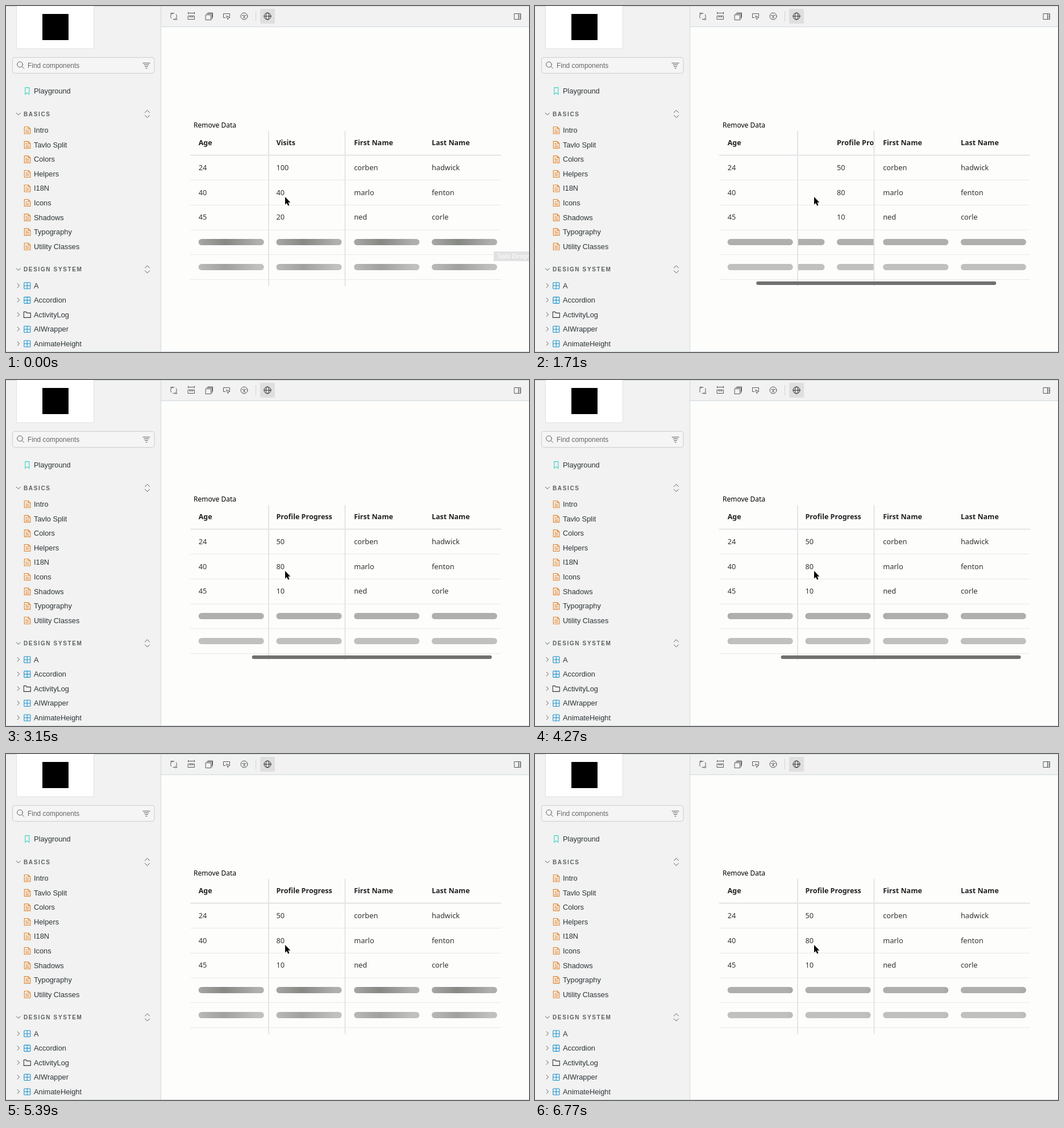
Recreate the animation shown at these times as an HTML page. Size 920 by 609 pixels, loop 6.79 s.

```html
<!DOCTYPE html>
<html lang="en">
<head>
<meta charset="utf-8">
<title>Pinned columns table</title>
<style>
  html, body { margin: 0; width: 100%; height: 100%; overflow: hidden; background: #fdfdfc; }
  svg { display: block; width: 920px; height: 609px; }
  text { white-space: pre; }
  .nav { font: 12.8px "Liberation Sans", Arial, sans-serif; fill: #2e3438; }
  .find { font: 11.9px "Liberation Sans", Arial, sans-serif; fill: #666; }
  .section { font: bold 10.06px "Liberation Sans", Arial, sans-serif; letter-spacing: 1.61px; fill: #5b5f62; }
  .tip { font: 10px "Liberation Sans", Arial, sans-serif; fill: #fff; }
  .title { font: 12px "Noto Sans", "Open Sans", sans-serif; fill: #000; }
  .head { font: 600 12.5px "Noto Sans", "Open Sans", sans-serif; fill: #222; }
  .cell { font: 12.8px "Noto Sans", "Open Sans", sans-serif; fill: #333; }
  .icon { fill: none; stroke: #55595c; stroke-width: 1; stroke-linecap: round; stroke-linejoin: round; }
  .doc { stroke: #e5832a; stroke-width: 1.1; }
  .part { stroke: #1c93d1; stroke-width: 1.1; }
  .mark { stroke: #3ad3c6; stroke-width: 1.1; }
  .folder { stroke: #35373f; stroke-width: 1.1; }
</style>
</head>
<body>
<svg viewBox="0 0 920 609">
  <defs>
    <linearGradient id="wave">
      <stop offset="0" stop-color="#afafad"/>
      <stop offset=".5" stop-color="#868883"/>
      <stop offset="1" stop-color="#afafad"/>
    </linearGradient>
    <clipPath id="middle"><rect x="462" y="220" width="135" height="262"/></clipPath>
  </defs>

  <rect width="920" height="609" fill="#fdfdfc"/>
  <rect width="920" height="36" fill="#f1f2f1"/>
  <rect width="273" height="609" fill="#f1f2f1"/>
  <path d="M272.5 0V609M273 36.5H920M0 .5H920M0 608.5H920" stroke="#d0d8dd"/>

  <rect x="18.5" y="-2" width="136" height="77" fill="#fff" stroke="#e0e1e1"/>
  <rect x="64" y="14" width="46" height="46"/>
  <rect x="11.5" y="90.5" width="249.5" height="28" rx="4" fill="#f5f5f5" stroke="#cbcdcd"/>
  <text class="find" x="38" y="108.5">Find components</text>
  <g class="icon">
    <circle cx="24.5" cy="103" r="4.8"/><path d="M28 106.5L31.500 110"/>
    <path d="M241 100.500H253M243 103.500H251M244.500 106.500H249.500M246 109.500H248"/>
  </g>
  <g id="nav"></g>

  <rect x="447" y="5" width="26" height="26" rx="2" fill="#dedfde"/>
  <path d="M439.500 9V27" stroke="#d3d6d7"/>
  <g class="icon">
    <path d="M290.500 21.500A5.600 5.600 0 0 1 296 12.800M299.500 15A5.600 5.600 0 0 1 294 23.600M290 14.500V12.500H293.500M300.500 22V24H297"/>
    <path d="M320.500 12.500H331.500M320.500 11V14M331.500 11V14M320.500 17.500H331.500V23.500H320.500zM323.500 17.500V20M326 17.500V20M328.500 17.500V20"/>
    <path d="M351.500 15.500H360.500V24.500H351.500zM353 13.500H362.500V23M355 12H363.500V20"/>
    <path d="M386 20.500H382.500V13.500H393.500V18M388 17.500L394 20 391.500 21 390.500 23.500z"/>
    <circle cx="419" cy="18" r="6"/><path d="M415.500 16.500L419 17.300 422.500 16.500M419 17.300V19L417 22M419 19L421 22M419 14.500V14.600"/>
    <g stroke="#333">
      <circle cx="460" cy="18" r="6"/><ellipse cx="460" cy="18" rx="2.800" ry="6"/><path d="M454 18H466"/>
    </g>
    <path d="M894.500 13.500H905.500V23.500H894.500zM901.500 13.500V23.500M903 16H904.500M903 18.500H904.500M903 21H904.500"/>
  </g>

  <text class="title" x="330" y="214.300">Remove Data</text>
  <g id="pinned"></g>
  <g clip-path="url(#middle)"><g id="scroller"></g></g>
  <path d="M324 306.500H871M324 350.500H871M324 394H871M324 437.500H871M324 481.500H871" stroke="#e9ebe6"/>
  <path d="M324 262.500H871" stroke="#d0d1d1"/>
  <path d="M462 220V493M596.500 220V493" stroke="#e5e5e8" stroke-width="2"/>
  <rect id="thumb" y="484.700" width="422" height="6.200" rx="3.100" fill="#707070"/>

  <g id="tip">
    <rect x="858" y="432" width="62" height="17" fill="#e1e2e1"/>
    <text class="tip" x="864" y="444">Tavlo Design</text>
  </g>
  <path d="M491 336V349.500L494 346.700 496.200 351.400 498.400 350.400 496.300 345.800H500.300z" stroke="#fff" stroke-width="1.600" paint-order="stroke"/>
</svg>

<script>
const $ = id => document.getElementById(id);
const text = (cls, x, y, s) => `<text class="${cls}" x="${x}" y="${y}">${s}</text>`;
const icon = (cls, x, y, d) => `<path class="icon ${cls}" transform="translate(${x} ${y})" d="${d}"/>`;

// Icon outlines, centred on 0,0
const shapes = {
  doc: 'M-5 -6H2L5.5 -2.500V6H-5zM2 -6V-2.500H5.500M-2.500 -2H0M-2.500 .7H3M-2.500 3.300H3',
  part: 'M-4.500 -5.500H4.500Q5.500 -5.500 5.500 -4.500V4.500Q5.500 5.500 4.500 5.500H-4.500Q-5.500 5.500 -5.500 4.500V-4.500Q-5.500 -5.500 -4.500 -5.500zM0 -5.500V5.500M-5.500 0H5.500',
  folder: 'M-6 -5H-2L-.5 -3H6V5H-6z',
  mark: 'M-3.500 -6H3.500V6L0 3 -3.500 6z',
  right: 'M-1.700 -3.500L1.800 0 -1.700 3.500',
  down: 'M-3.500 -1.700L0 1.800 3.500 -1.700',
  expand: 'M-4 -2.500L0 -6.500 4 -2.500M-4 2.500L0 6.500 4 2.500'
};

const item = (kind, label, y) =>
  icon(kind, 37.3, y + .3, shapes[kind]) + text('nav', 49, y + 4.700, label);
const section = (label, y) =>
  icon('', 21.800, y, shapes.down) + text('section', 31, y + 3.700, label) + icon('', 248.500, y, shapes.expand);

const pages = ['Intro', 'Tavlo Split', 'Colors', 'Helpers', 'I18N', 'Icons', 'Shadows', 'Typography', 'Utility Classes'];
const parts = ['A', 'Accordion', 'ActivityLog', 'AIWrapper', 'AnimateHeight'];
const gap = 25.550;

$('nav').innerHTML = item('mark', 'Playground', 149.300)
  + section('BASICS', 190) + pages.map((s, i) => item('doc', s, 218.500 + i * gap)).join('')
  + section('DESIGN SYSTEM', 463.500) + parts.map((s, i) => {
    const y = 492 + i * gap;
    return icon('', 21.800, y, shapes.right) + item(s === 'ActivityLog' ? 'folder' : 'part', s, y);
  }).join('');

const bar = (x, y, opacity) =>
  `<rect x="${x}" y="${y}" width="115" height="11" rx="5.5" fill="url(#wave)" opacity="${opacity}"/>`;
const column = (x, head, ...cells) => text('head', x, 245, head)
  + cells.map((s, i) => text('cell', x, 288.800 + i * 43.700, s)).join('')
  + bar(x, 410, 1) + bar(x, 454, .78);

$('pinned').innerHTML = column(338.700, 'Age', 24, 40, 45)
  + column(612.200, 'First Name', 'corben', 'marlo', 'ned')
  + column(748.900, 'Last Name', 'hadwick', 'fenton', 'corle');
$('scroller').innerHTML = column(475.400, 'Visits', 100, 40, 20)
  + column(612, 'Profile Progress', 50, 80, 10);

const LOOP = 6790, WAVE = 5420;
const path = [[200, 0], [630, 19], [770, 24.5], [1330, 56], [1710, 81], [2030, 101], [2600, 130], [2950, 136.5]];
const clamp = v => Math.max(0, Math.min(1, v));

// Pictures are held in a repeating rhythm of 20, 20 and 100 ms.
function snap(t) {
  if (t < 30) return t < 20 ? 0 : 20;
  const r = (t - 30) % 140;
  return t - r + (r < 20 ? 0 : r < 40 ? 20 : 40);
}

function scrollAt(t) {
  const i = path.findIndex(p => p[0] > t);
  if (i < 0) return 136.5;
  if (i === 0) return 0;
  const [t0, a] = path[i - 1], [t1, b] = path[i];
  return a + (b - a) * (t - t0) / (t1 - t0);
}

function draw(t) {
  const mid = -.5 + 2 * clamp((t + 1233) % WAVE / (WAVE / 2));
  $('wave').setAttribute('x1', mid - .5);
  $('wave').setAttribute('x2', mid + .5);

  const shift = scrollAt(t);
  $('scroller').setAttribute('transform', `translate(${-shift} 0)`);
  $('thumb').setAttribute('x', 326 + shift * .781);
  $('thumb').setAttribute('opacity', t < 200 ? 0 : clamp((5230 - t) / 600));
  $('tip').setAttribute('visibility', t < 20 ? 'visible' : 'hidden');
}

const start = performance.now();
function tick() {
  draw(snap((performance.now() - start) % LOOP));
  requestAnimationFrame(tick);
}
tick();
</script>
</body>
</html>
```
